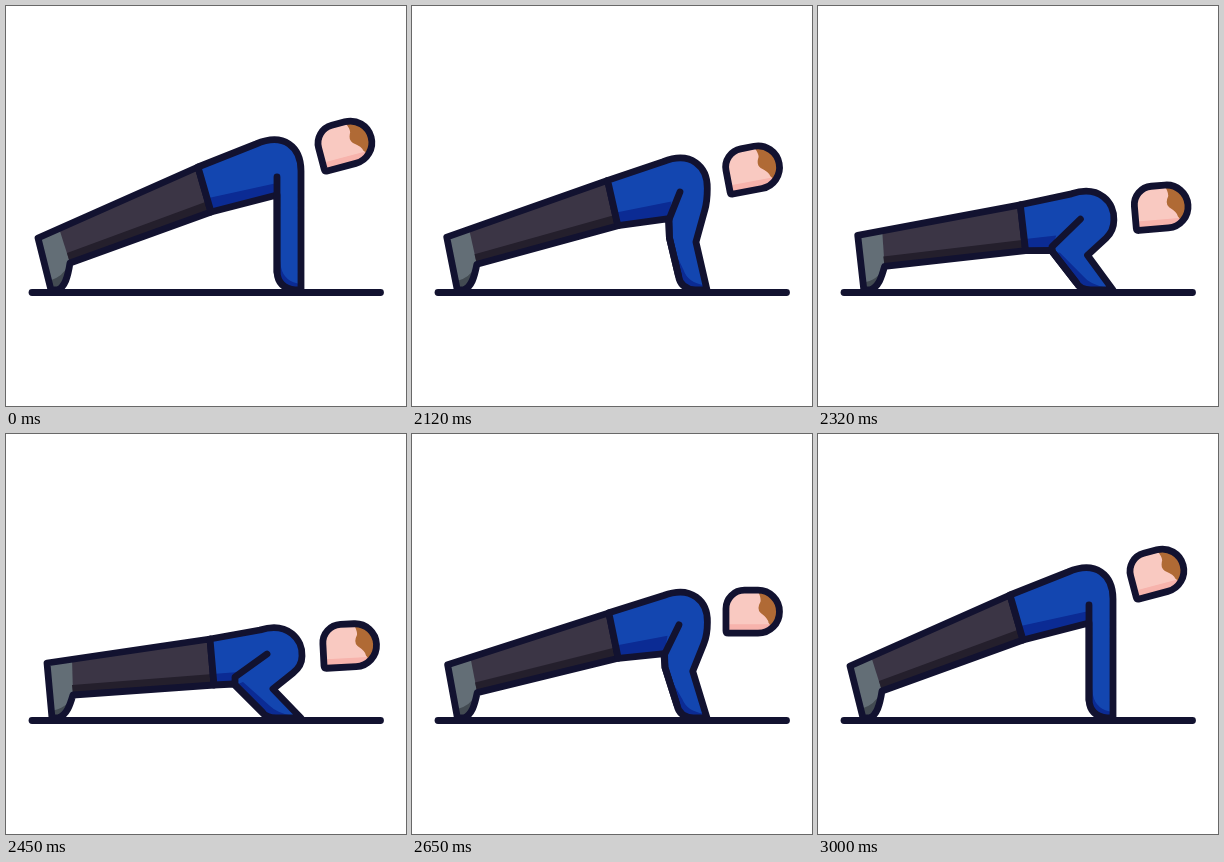
Write an HTML page with a canvas that moves like this. It is 400 by 400 pixels and loops after 3.02 s.

```html
<!DOCTYPE html>
<html>
<head>
<meta charset="utf-8">
<title>Push-up</title>
<style>
  html, body { margin: 0; width: 100%; height: 100%; overflow: hidden; background: #fff; }
  canvas { display: block; }
</style>
</head>
<body>
<canvas width="400" height="400"></canvas>
<script>
const ctx = document.querySelector('canvas').getContext('2d');
const LOOP = 3020;
const INK = '#121230';

// time, body dip (0 up, 1 down), head x, head y, head angle
const keys = [
  [2000, 0, 339, 138, -14.8],
  [2020, 0.01, 339, 139.5, -14.5],
  [2220, 0.65, 342.5, 186.5, -7],
  [2450, 1, 343.5, 211.5, -3],
  [2500, 1, 343.6, 212, -2.5],
  [2650, 0.41, 340.5, 178, 0],
  [2750, 0.01, 337.5, 134.8, -19],
  [2810, 0, 338, 129, -22],
  [3000, 0, 339, 138, -14.8]
];

const secant = (i, c) => (keys[i + 1][c] - keys[i][c]) / (keys[i + 1][0] - keys[i][0]);

function slope(i, c) {
  if (i === 0 || i === keys.length - 1) return 0;
  const a = secant(i - 1, c), b = secant(i, c);
  return a * b <= 0 ? 0 : 2 * a * b / (a + b);
}

// Monotone cubic interpolation of one column
function track(t, c) {
  const last = keys.length - 1;
  if (t <= keys[0][0]) return keys[0][c];
  if (t >= keys[last][0]) return keys[last][c];
  const i = keys.findIndex(k => k[0] > t) - 1;
  const h = keys[i + 1][0] - keys[i][0];
  const u = (t - keys[i][0]) / h, v = 1 - u;
  return v * v * (1 + 2 * u) * keys[i][c] + u * u * (3 - 2 * u) * keys[i + 1][c]
    + h * u * v * (v * slope(i, c) - u * slope(i + 1, c));
}

function fill(d, color) {
  ctx.fillStyle = color;
  ctx.fill(new Path2D(d));
}

function line(d) {
  ctx.stroke(new Path2D(d));
}

function clipped(d, draw) {
  ctx.save();
  ctx.clip(new Path2D(d));
  draw();
  ctx.restore();
}

function drawBody(p) {
  // Point between the raised and lowered pose, with an optional bow midway
  const at = (x0, y0, x1, y1, bx = 0, by = 0) => {
    const bow = 4 * p * (1 - p);
    return `${x0 + (x1 - x0) * p + bx * bow} ${y0 + (y1 - y0) * p + by * bow} `;
  };

  const ankle = at(32, 232, 41, 229);
  const hipTop = at(192, 161, 204, 205);
  const hipLow = at(205, 206, 208, 251);
  const instep = at(64, 257, 67, 261);
  const heel = at(45, 284, 46, 284);
  const toe = at(51, 284, 52, 284);
  const lower = `M${ankle}L${hipTop}L${hipLow}L${instep}`
    + `C${at(62, 270, 64, 271)} ${at(59, 282, 61, 281)} ${toe}L${heel}Z`;

  clipped(lower, () => {
    fill(lower, '#636e76');
    fill(`M${at(53, 222, 66, 224)}L${hipTop}L${hipLow}L${instep}Z`, '#3b3545');
    fill(`M${at(61, 247, 66, 251)}L${at(202, 195, 207, 240)}L${hipLow}L${instep}Z`, '#241f2c');
    fill(`M${instep}Q${at(57, 271, 61, 275)} ${at(43, 275, 44, 277)}`
      + `L${heel}L${at(66, 286, 68, 286)}Z`, '#434b52');
  });
  line(lower);

  const elbow = at(271, 228, 229, 251, -1, -4);
  const crook = at(271, 189, 229, 243, -2, 11);
  const belly = at(271, 189, 228, 250, -1, 6);
  const hand = at(271, 266, 256, 278);
  const palm = at(289, 284, 270, 284);
  const wrist = at(295, 284, 295, 284);
  const heelOfHand = at(272, 282, 260, 284);
  const upper = `M${hipTop}L${at(250, 138, 254, 196)}`
    + `C${at(278, 126, 282, 187)} ${at(295, 141, 297, 206)} ${at(295, 165, 296, 222)}`
    + `Q${at(295, 180, 296, 232)} ${at(295, 190, 287, 239)}`
    + `L${at(295, 235, 267, 255, -3, -6)}L${wrist}L${palm}`
    + `Q${heelOfHand} ${hand}L${elbow}L${belly}L${hipLow}Z`;

  clipped(upper, () => {
    fill(upper, '#1346b0');
    fill(`M${at(198, 193, 206, 240)}L${at(271, 177, 233, 238)}L${crook}L${belly}L${hipLow}Z`, '#0b2b94');
    fill(`M${elbow}L${at(272, 240, 237, 248)}L${at(275, 261, 264, 272)}`
      + `Q${at(278, 276, 271, 279)} ${at(295, 278, 287, 282)}L${wrist}L${palm}`
      + `Q${heelOfHand} ${hand}Z`, '#0b2b94');
  });
  line(upper);
  line(`M${at(271, 171, 261, 220)}L${crook}L${elbow}L${hand}`);
}

function drawHead(x, y, angle) {
  const skull = 'M-24 21.5Q-26.5 21.5 -26.5 19V-3A18.5 18.5 0 0 1 -8 -21.5H5.5A21.5 21.5 0 0 1 5.5 21.5Z';
  ctx.save();
  ctx.translate(x, y);
  ctx.rotate(angle * Math.PI / 180);
  clipped(skull, () => {
    fill(skull, '#f9c9c1');
    fill('M-30 12.5H30V30H-30Z', '#f7b3ac');
    fill('M4 -24Q9 -14 8 -10Q4 -3 8 1Q16 7 16 11Q20 15 18 24H32V-24Z', '#b06a35');
  });
  line(skull);
  ctx.restore();
}

function frame() {
  const t = performance.now() % LOOP;
  ctx.clearRect(0, 0, 400, 400);
  ctx.strokeStyle = INK;
  ctx.lineWidth = 6.8;
  ctx.lineCap = ctx.lineJoin = 'round';
  drawBody(track(t, 1));
  drawHead(track(t, 2), track(t, 3), track(t, 4));
  line('M26 286.5H374.5');
  requestAnimationFrame(frame);
}
frame();
</script>
</body>
</html>
```
